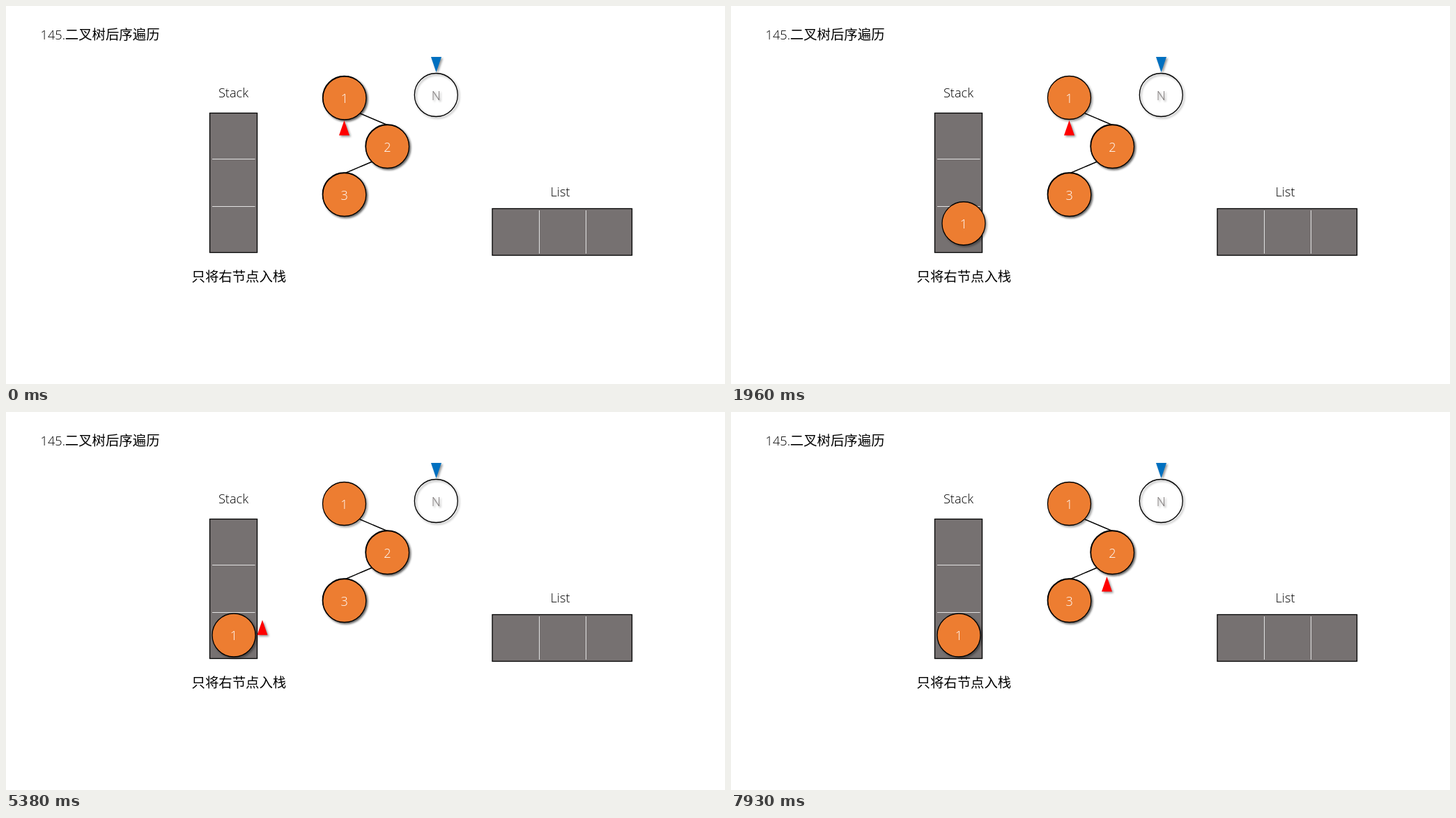
Write an HTML page that moves like this. It is 1032 px wide and 542 px high and loops after 8 s.

```html
<!DOCTYPE html>
<html lang="zh">
<head>
<meta charset="utf-8">
<title>二叉树后序遍历</title>
<style>
  html, body { margin: 0; width: 100%; height: 100%; overflow: hidden; background: #fff; }
  svg { display: block; width: 100%; height: 100%; }
  text { font: 300 18.2px "Open Sans", "Noto Sans", sans-serif; text-anchor: middle; }
  .han { font: 300 19.4px "Noto Sans CJK SC", "Noto Sans CJK", sans-serif; text-anchor: start; }
  .box rect { fill: #767171; stroke: #000; stroke-width: 1.3; }
  .box path { stroke: #e2e2e2; stroke-width: 1; }
  .edge { stroke: #000; stroke-width: 1.5; }
  .node circle { fill: #ed7d31; stroke: #000; stroke-width: 1.3; }
  .node text { fill: #fff; }
  .null circle { fill: none; }
  .null text { fill: #767171; }
  .shade { filter: drop-shadow(2.2px 2.2px 1.8px rgba(0, 0, 0, .4)); }
</style>
</head>
<body>
<svg viewBox="0 0 1032 542">
  <defs>
    <circle id="disc" r="31"/>
  </defs>

  <text x="49.5" y="48" style="text-anchor:start">145.<tspan class="han" x="84.8">二叉树后序遍历</tspan></text>
  <text x="326.5" y="130.5">Stack</text>
  <text x="795.5" y="272.5">List</text>
  <text class="han" x="266.5" y="394.5">只将右节点入栈</text>

  <g class="box">
    <rect x="292.5" y="153.5" width="68" height="200"/>
    <path d="M296 219.5H357.5M296 287.5H357.5"/>
    <rect x="698" y="290.5" width="200.5" height="67"/>
    <path d="M765.5 293V355M832.5 293V355"/>
  </g>

  <path class="edge" d="M508 154L547 170.5M526 223L486 240"/>
  <g id="nodes"></g>

  <path class="shade" fill="#0070c0" d="M610 73H625L617.5 95Z"/>
  <path id="pointer" class="shade" fill="#f00" d="M0 0L7.5 21.5H-7.5Z"/>
</svg>

<script>
const LOOP = 8000;
const MOVE = 1743;
const NS = "http://www.w3.org/2000/svg";
const nodes = document.getElementById("nodes");
const pointer = document.getElementById("pointer");

function addNode(label, x, y, kind = "") {
  const node = document.createElementNS(NS, "g");
  node.setAttribute("class", `node shade ${kind}`);
  node.innerHTML = `<circle r="31"/><text y="7">${label}</text>`;
  nodes.append(node);
  place(node, [x, y]);
  return node;
}

function place(el, [x, y]) {
  el.setAttribute("transform", `translate(${x.toFixed(2)} ${y.toFixed(2)})`);
}

addNode("N", 617.3, 127.5, "null");
// Stacked copies wait on nodes 2 and 3.
for (const shift of [0, 0.5]) {
  addNode(2, 547 + shift, 201 + shift);
  addNode(3, 485.3 + shift, 270 + shift);
}
addNode(1, 485.5, 131.5);
const pushed = addNode(1, 486, 132);

// Each burst of redraws: first time, last time, number of pictures.
const bursts = [
  [320, 1120, 11], [1190, 1960, 11], [2040, 2820, 11], [2890, 3670, 11], [3760, 4300, 8],
  [4520, 5310, 12], [5380, 6150, 11], [6230, 6230, 1], [6380, 7160, 11], [7240, 7930, 10]
];

function heldTime(t) {
  const burst = bursts.findLast(([first]) => t >= first);
  if (!burst) return 0;
  const [first, last, count] = burst;
  if (count === 1) return first;
  const step = (last - first) / (count - 1);
  return first + step * Math.min(count - 1, Math.floor((t - first + 6) / step));
}

function ease(u) {
  u = Math.min(1, Math.max(0, u));
  return u < 0.5 ? 2 * u * u : 1 - 2 * (1 - u) ** 2;
}

// Follows legs of [start time, x, y] from a starting point.
function along(from, legs, t) {
  let [x, y] = from;
  for (const [start, toX, toY] of legs) {
    const k = ease((t - start) / MOVE);
    x += (toX - x) * k;
    y += (toY - y) * k;
  }
  return [x, y];
}

const pushLegs = [[475, 327, 320]];
const pointerLegs = [[2442, 417.5, 229], [4452, 329.5, 352], [6423, 547.5, 231.7]];

function draw(now) {
  const t = heldTime(now % LOOP);
  place(pushed, along([486, 132], pushLegs, t));
  place(pointer, along([485.5, 164], pointerLegs, t));
  requestAnimationFrame(draw);
}
draw(performance.now());
</script>
</body>
</html>
```
